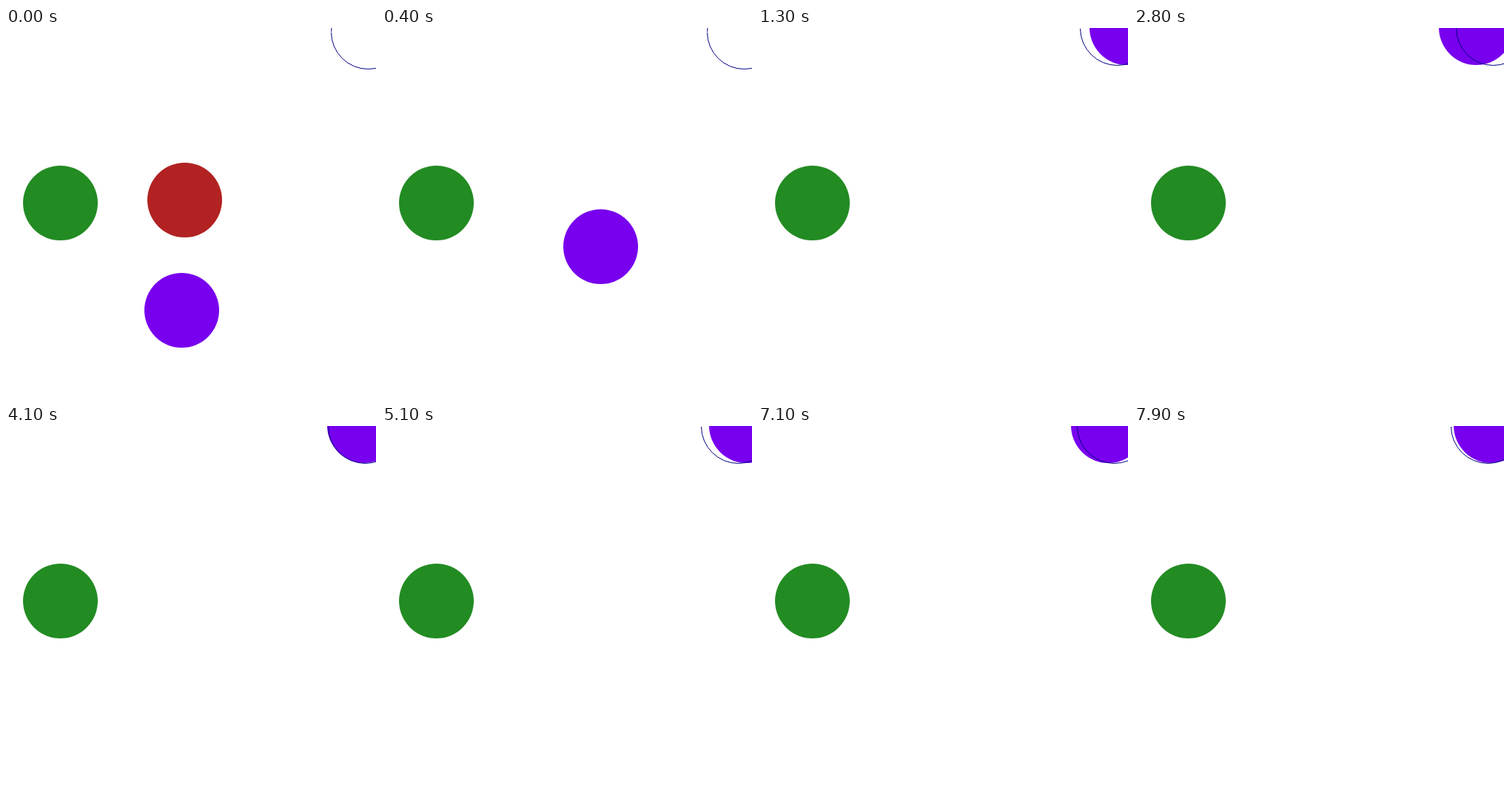
These frames come from a looping animation (500 px wide and 500 px high, 8000 ms). An HTML page:

```html
<!DOCTYPE html>
<html lang="en">
<head>
<meta charset="utf-8">
<title>Circles</title>
<style>
  html, body { margin: 0; width: 100%; height: 100%; overflow: hidden; background: #fff; }
  svg { display: block; width: 500px; height: 500px; }
</style>
</head>
<body>
<svg viewBox="0 0 500 500">
  <circle cx="73.5" cy="236.5" r="50.5" fill="#228b22"/>
  <circle id="red" cx="241.5" cy="232.5" r="50.5" fill="#b22222"/>
  <circle id="mover" r="50.5" fill="#7800ee"/>
  <circle id="ring" r="50" fill="none" stroke="#000080" pathLength="360" stroke-dasharray="179.4 1.2 179.4 0"/>
</svg>
<script>
const LOOP = 8000, STEP = 100;
const HIT = 4, ARRIVE = 10;
const red = document.getElementById('red');
const mover = document.getElementById('mover');
const ring = document.getElementById('ring');

// Damped spring from rest, 0 to 1
function spring(n) {
  const w = 0.1775, d = 0.03;
  return 1 - Math.exp(-d * n) * (Math.cos(w * n) + d / w * Math.sin(w * n));
}

// Fading swing along the top edge, stopped by the right wall
function sway(n) {
  const t = n - 11;
  return Math.min(498, 480.3 + 28 * Math.exp(-0.0206 * t) * Math.cos(0.166 * t));
}

function moverAt(n) {
  if (n >= ARRIVE) return [sway(n), -1];
  const p = spring(n);
  return [237 + 254 * p, 381 - 376.5 * p];
}

// The ring moves up once, and left in three jumps
function ringAt(n) {
  const x = n < ARRIVE ? 489 : n < 49 ? 485 : n < 75 ? 481 : 478;
  return [x, n < ARRIVE ? 5 : 0];
}

function place(el, [x, y]) {
  el.setAttribute('cx', Math.round(x) + 0.5);
  el.setAttribute('cy', Math.round(y) + 0.5);
}

function draw(time) {
  const n = Math.floor(time % LOOP / STEP);
  place(mover, moverAt(n));
  place(ring, ringAt(n));
  red.style.visibility = n < HIT ? 'visible' : 'hidden';
}

const start = performance.now();
function tick() {
  draw(performance.now() - start);
  requestAnimationFrame(tick);
}
tick();
</script>
</body>
</html>
```
